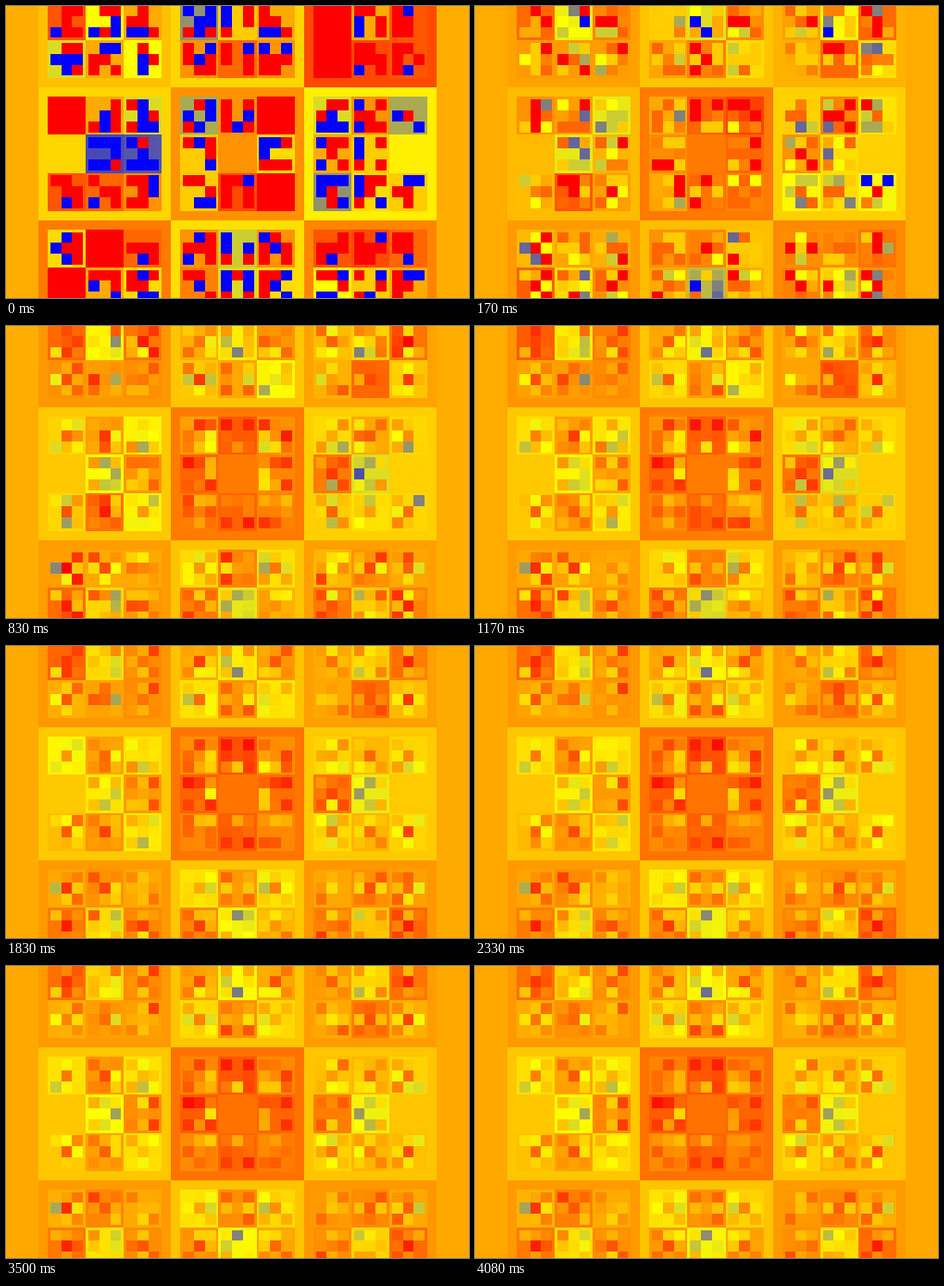
These frames come from a looping animation (500x316 px, 4160 ms). An HTML page with a canvas:

```html
<!DOCTYPE html>
<html lang="en">
<head>
<meta charset="utf-8">
<title>Random tic-tac-toe, three moves deep</title>
<style>
  html, body { margin: 0; width: 100%; height: 100%; overflow: hidden; background: #fa0; }
  canvas { display: block; width: 500px; height: 316px; }
</style>
</head>
<body>
<canvas width="500" height="316"></canvas>
<script>
const ctx = document.querySelector('canvas').getContext('2d');
const STEPS = 50, LOOP = 4160, STEP_MS = 250 / 3;
const SIZE = 500, TOP = -90, INNER = 0.86;
const DEPTH = 3, GAMES_PER_STEP = 2;
const X = 1, O = 2;
const nine = [...Array(9).keys()];

// Rows, columns and diagonals of the board.
const LINES = [
  ...[0, 1, 2].flatMap(i => [[3 * i, 3 * i + 1, 3 * i + 2], [i, i + 3, i + 6]]),
  [0, 4, 8], [2, 4, 6]
];

let seed = 20;
function random() {
  seed = (seed + 0x6d2b79f5) | 0;
  let t = Math.imul(seed ^ (seed >>> 15), 1 | seed);
  t = (t + Math.imul(t ^ (t >>> 7), 61 | t)) ^ t;
  return ((t ^ (t >>> 14)) >>> 0) / 4294967296;
}

// Finish a game with random moves; returns the winner, or 0 for a draw.
function rollout(moves) {
  const board = Array(9).fill(0);
  moves.forEach((m, i) => board[m] = i % 2 ? O : X);
  const free = nine.filter(i => !board[i]);
  let player = moves.length % 2 ? O : X;
  while (free.length) {
    const [m] = free.splice(Math.floor(random() * free.length), 1);
    board[m] = player;
    if (LINES.some(line => line.every(i => board[i] === player))) return player;
    player = X + O - player;
  }
  return 0;
}

// Every node holds running totals per step; only decided games count.
function grow(moves = [], parents = []) {
  const node = { won: new Float32Array(STEPS), played: new Float32Array(STEPS), kids: [] };
  const chain = [...parents, node];
  if (moves.length < DEPTH) {
    for (const m of nine) {
      if (!moves.includes(m)) node.kids[m] = grow([...moves, m], chain);
    }
    return node;
  }
  let won = 0, played = 0;
  for (let k = 0; k < STEPS; k++) {
    for (let n = k ? GAMES_PER_STEP : 1; n > 0; n--) {
      const winner = rollout(moves);
      if (winner) played++;
      if (winner === X) won++;
    }
    for (const c of chain) {
      c.won[k] += won;
      c.played[k] += played;
    }
  }
  return node;
}

// Blue for lost, yellow for even, red for won.
function color(v) {
  const up = Math.round(Math.min(1, 2 * v) * 255);
  const green = Math.round(Math.min(2 * v, 2 - 2 * v) * 255);
  return `rgb(${up},${green},${255 - up})`;
}

function paint(node, k, x, y, size) {
  if (node.played[k]) {
    const left = Math.round(x), top = Math.round(y);
    ctx.fillStyle = color(node.won[k] / node.played[k]);
    ctx.fillRect(left, top, Math.round(x + size) - left, Math.round(y + size) - top);
  }
  const pad = size * (1 - INNER) / 2, step = size * INNER / 3;
  node.kids.forEach((kid, i) =>
    paint(kid, k, x + pad + (i % 3) * step, y + pad + Math.floor(i / 3) * step, step));
}

const root = grow();
const start = performance.now();
let shown = -1;

function frame() {
  const t = (performance.now() - start) % LOOP;
  let k = STEPS - 1;
  // Steps fall on whole hundredths of a second.
  while (k > 0 && Math.round(k * STEP_MS / 10) * 10 > t) k--;
  if (k !== shown) paint(root, shown = k, 0, TOP, SIZE);
  requestAnimationFrame(frame);
}
frame();
</script>
</body>
</html>
```
